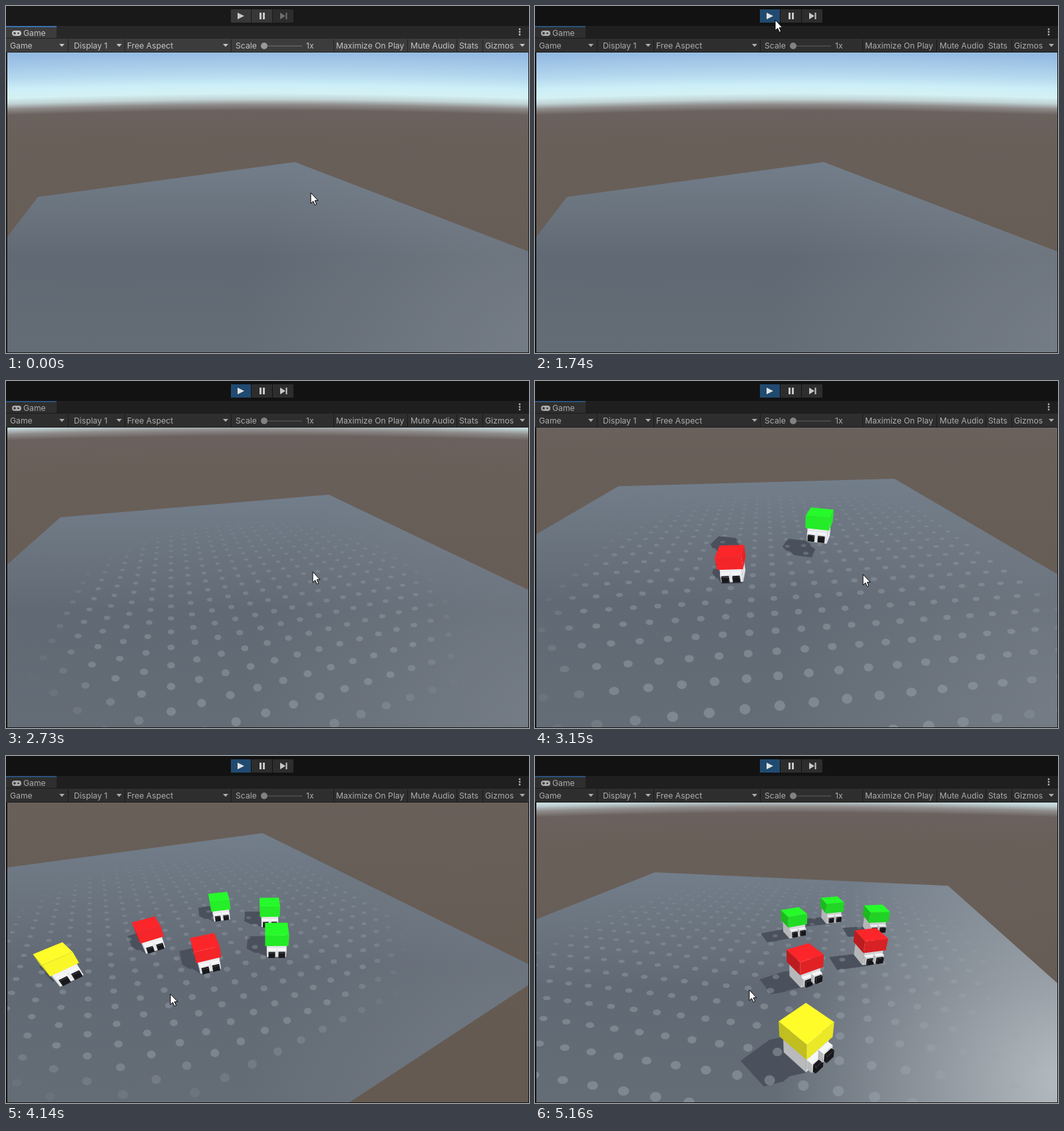
An HTML page with a canvas that plays this animation: 786x522 px, repeating every 5.19 s.

```html
<!DOCTYPE html>
<html>
<head>
<meta charset="utf-8">
<style>
  html, body { margin: 0; width: 100%; height: 100%; overflow: hidden; background: #191919; }
  canvas { display: block; }
</style>
</head>
<body>
<canvas id="stage" width="786" height="522"></canvas>
<script>
const ctx = document.getElementById('stage').getContext('2d');
const LOOP = 5190, STEP = 30, PLAY_AT = 420;
const FOCAL = 391, CX = 393, CY = 295;
const VIEW = { x: 2, y: 70, w: 783, h: 451 };
const HALF = 5;
const LIGHT = [0.41, -0.91], SHADOW = [-0.37, 0.83];

// time, camera x, z, height, yaw, pitch (degrees)
const CAMERA = [
  [1740, -2.12, -5.48, 3.1, 28.1, 22.6],
  [2340, -2.07, -5.36, 3.1, 28, 28.2],
  [3150, 0.18, -4.9, 2.44, 6.1, 34],
  [4140, -0.41, -5.62, 2.84, 28, 38],
  [4740, -3.44, -4.31, 3.56, 49, 33.6],
  [5160, -3.64, -1.68, 2.39, 80.5, 31]
];
// time, pointer x, y
const POINTER = [
  [30, 458, 281], [210, 361, 21], [1740, 361, 21], [2340, 414, 283],
  [3150, 493, 291], [4140, 247, 358], [4740, 289, 360], [5160, 322, 352]
];
// time, center x, z and radius of the visible dots
const DOT_PATCH = [[1900, -0.4, -0.9, 0], [2340, -0.4, -0.9, 2.6], [3150, 0.8, -0.3, 4.3]];

const RED = [252, 38, 42], GREEN = [38, 250, 42], YELLOW = [255, 252, 42];
const WHITE = [244, 246, 248], BLACK = [26, 26, 30];
const CREW = [
  { x: -0.46, z: -1.27, color: RED, lands: 3155 },
  { x: 1.0, z: -0.85, color: GREEN, lands: 3185 },
  { x: 0.27, z: -2.25, color: RED, lands: 3500 },
  { x: 1.8, z: -1.55, color: GREEN, lands: 3600 },
  { x: 1.45, z: -2.45, color: GREEN, lands: 3700 },
  { x: -1.79, z: -1.47, color: YELLOW, lands: 3800 }
];
const FALL_TIME = 350, FALL_HEIGHT = 2.5, TURN_LAG = 330, SIZE = 0.93;

const clamp = (v, lo = 0, hi = 1) => Math.max(lo, Math.min(hi, v));
const rgb = (c, k = 1) => `rgb(${c.map(v => Math.round(v * k)).join()})`;
const gray = v => rgb([v, v, v]);

// Smooth curve through the keys; at rest at both ends and on repeated values.
function sample(keys, t) {
  const last = keys.length - 1;
  if (t <= keys[0][0]) return keys[0].slice(1);
  if (t >= keys[last][0]) return keys[last].slice(1);
  const i = keys.findIndex(k => k[0] > t) - 1;
  const a = keys[i], b = keys[i + 1], span = b[0] - a[0], u = (t - a[0]) / span;
  const slope = (n, j) => {
    if (n === 0 || n === last) return 0;
    const p = keys[n - 1], k = keys[n], q = keys[n + 1];
    const before = (k[j] - p[j]) / (k[0] - p[0]), after = (q[j] - k[j]) / (q[0] - k[0]);
    return before * after <= 0 ? 0 : 2 * before * after / (before + after);
  };
  return a.slice(1).map((_, n) => {
    const j = n + 1, m0 = slope(i, j) * span, m1 = slope(i + 1, j) * span;
    const d = b[j] - a[j];
    return a[j] + u * (m0 + u * (3 * d - 2 * m0 - m1 + u * (m0 + m1 - 2 * d)));
  });
}

let cam;
function setCamera(t) {
  const [x, z, h, yaw, pitch] = sample(CAMERA, t);
  const y = yaw * Math.PI / 180, p = pitch * Math.PI / 180;
  cam = { x, z, h, yaw, cy: Math.cos(y), sy: Math.sin(y), cp: Math.cos(p), sp: Math.sin(p) };
}

function toCamera([x, y, z]) {
  const dx = x - cam.x, dz = z - cam.z, drop = cam.h - y;
  const ahead = dx * cam.sy + dz * cam.cy;
  return [dx * cam.cy - dz * cam.sy, drop * cam.cp - ahead * cam.sp, ahead * cam.cp + drop * cam.sp];
}
const toScreen = ([x, y, d]) => [CX + FOCAL * x / d, CY + FOCAL * y / d];

function clipNear(points, near = 0.05) {
  const out = [];
  points.forEach((a, i) => {
    const b = points[(i + 1) % points.length];
    if (a[2] > near) out.push(a);
    if ((a[2] > near) !== (b[2] > near)) {
      const u = (near - a[2]) / (b[2] - a[2]);
      out.push(a.map((v, j) => v + (b[j] - v) * u));
    }
  });
  return out;
}

function path(points) {
  ctx.beginPath();
  points.forEach(p => ctx.lineTo(p[0], p[1]));
  ctx.closePath();
}
function polygon(points, fill) {
  const visible = clipNear(points.map(toCamera));
  if (visible.length < 3) return;
  path(visible.map(toScreen));
  ctx.fillStyle = fill;
  ctx.fill();
}

function drawSky() {
  const haze = CY - FOCAL * cam.sp / cam.cp + 19;
  const g = ctx.createLinearGradient(0, -100, 0, 400);
  [[-100, '#8ab0dc'], [-78, '#9abfe4'], [-50, '#b4d8ee'], [-32, '#cdeff8'], [-20, '#d4f1f3'],
   [-11, '#c0d2d4'], [-3, '#8f8c8b'], [6, '#6b625f'], [40, '#69605a'], [400, '#645a51']]
    .forEach(([y, c]) => g.addColorStop((y + 100) / 500, c));
  for (let x = 0; x < 786; x += 6) {
    const bend = 17 * (Math.hypot(1, (x + 3 - CX) / FOCAL) - 1);
    ctx.save();
    ctx.translate(0, haze + bend);
    ctx.fillStyle = g;
    ctx.fillRect(x, -300, 6, 900);
    ctx.restore();
  }
}

function drawFloor() {
  const corners = [[-HALF, 0, HALF], [HALF, 0, HALF], [HALF, 0, -HALF], [-HALF, 0, -HALF]];
  const top = Math.min(...corners.slice(0, 2).map(c => toScreen(toCamera(c))[1]));
  const g = ctx.createLinearGradient(0, top, 0, 521);
  g.addColorStop(0, '#737e8b');
  g.addColorStop(0.2, '#6c7681');
  g.addColorStop(0.5, '#616974');
  g.addColorStop(1, '#646c76');
  polygon(corners, g);
  const shine = 0.18 + 0.7 * clamp((cam.yaw - 49) / 31);
  const glow = ctx.createRadialGradient(800, 490, 20, 800, 490, 440);
  glow.addColorStop(0, `rgba(188,195,200,${shine})`);
  glow.addColorStop(1, 'rgba(188,195,200,0)');
  polygon(corners, glow);
}

function drawDots(t) {
  const [px, pz, reach] = sample(DOT_PATCH, t);
  ctx.fillStyle = '#9aa3ab';
  for (let i = -13; i < 13; i++) for (let j = -13; j < 13; j++) {
    const x = (i + 0.5) / 3, z = (j + 0.5) / 3;
    const shown = clamp((reach - Math.hypot(x - px, z - pz)) * 1.5);
    const p = toCamera([x, 0, z]);
    if (!shown || p[2] < 0.3) continue;
    const [sx, sy] = toScreen(p), r = 0.052 * FOCAL / p[2];
    ctx.globalAlpha = shown * clamp(0.68 - p[2] * 0.065, 0.08, 0.5);
    ctx.beginPath();
    ctx.ellipse(sx, sy, r, r * clamp(cam.h / Math.hypot(...p) + 0.1), 0, 0, 7);
    ctx.fill();
  }
  ctx.globalAlpha = 1;
}

// Footprint of a box from back/front and left/right offsets in the facing direction.
function footprint(at, [back, front], [left, right]) {
  const c = Math.cos(at.facing) * SIZE, s = Math.sin(at.facing) * SIZE;
  return [[front, left], [front, right], [back, right], [back, left]]
    .map(([f, r]) => [at.x + f * c - r * s, at.z + f * s + r * c]);
}

function box(at, depth, width, [low, high], color) {
  const base = footprint(at, depth, width), y0 = at.y + low * SIZE, y1 = at.y + high * SIZE;
  base.forEach(([x, z], k) => {
    const [x2, z2] = base[(k + 1) % 4], a = at.facing + k * Math.PI / 2;
    const nx = Math.cos(a), nz = Math.sin(a);
    if (nx * (cam.x - x) + nz * (cam.z - z) <= 0) return;
    const shade = 0.86 + 0.12 * (nx * LIGHT[0] + nz * LIGHT[1]);
    polygon([[x, y0, z], [x2, y0, z2], [x2, y1, z2], [x, y1, z]], rgb(color, shade));
  });
  if (cam.h > y1) polygon(base.map(([x, z]) => [x, y1, z]), rgb(color));
}

function boxShadow(at, half, low, high) {
  const base = footprint(at, [-half, half], [-half, half]);
  const cast = ([x, z], y) => [x + SHADOW[0] * y, 0, z + SHADOW[1] * y];
  const y0 = at.y + low * SIZE, y1 = at.y + high * SIZE, fill = '#4a515d';
  base.forEach((p, k) => {
    const q = base[(k + 1) % 4];
    polygon([cast(p, y0), cast(q, y0), cast(q, y1), cast(p, y1)], fill);
  });
  polygon(base.map(p => cast(p, y1)), fill);
}

// Each member drops in, then keeps turning toward where the camera was a moment ago.
function crewAt(t) {
  const [lookX, lookZ] = sample(CAMERA, t - TURN_LAG);
  return CREW.filter(m => t >= m.lands - FALL_TIME).map(m => {
    const u = clamp((t - m.lands) / FALL_TIME + 1);
    return {
      ...m,
      y: FALL_HEIGHT * (1 - u * u),
      facing: Math.atan2(lookZ - m.z, lookX - m.x),
      distance: Math.hypot(m.x - cam.x, m.z - cam.z)
    };
  }).sort((a, b) => b.distance - a.distance);
}

function drawShadows(crew) {
  crew.forEach(m => {
    boxShadow(m, 0.18, 0, 0.27);
    boxShadow(m, 0.21, 0.27, 0.5);
  });
}

function drawCrew(crew) {
  crew.forEach(m => {
    box(m, [-0.18, 0.18], [-0.18, 0.18], [0, 0.27], WHITE);
    for (const side of [-0.09, 0.09]) {
      box(m, [0.18, 0.25], [side - 0.08, side + 0.08], [0.05, 0.2], WHITE);
      box(m, [0.25, 0.29], [side - 0.06, side + 0.06], [0.06, 0.17], BLACK);
    }
    box(m, [-0.21, 0.21], [-0.21, 0.21], [0.27, 0.5], m.color);
  });
}

function rect(x, y, w, h, fill) {
  ctx.fillStyle = fill;
  ctx.fillRect(x, y, w, h);
}
function shape(points, fill) {
  path(points);
  ctx.fillStyle = fill;
  ctx.fill();
}
function disc(x, y, r, fill) {
  ctx.beginPath();
  ctx.arc(x, y, r, 0, 7);
  ctx.fillStyle = fill;
  ctx.fill();
}

function drawToolbar(playing) {
  const ink = gray(playing ? 172 : 196), edge = gray(playing ? 27 : 35);
  const bar = gray(playing ? 46 : 60), button = gray(playing ? 45 : 56);
  rect(0, 0, 786, 30, gray(playing ? 18 : 25));
  rect(0, 30, 786, 19, gray(playing ? 31 : 40));
  rect(0, 30, 76, 19, bar);
  rect(0, 30, 76, 2, playing ? '#2b527c' : '#3a72b0');
  rect(0, 49, 786, 20, bar);
  rect(0, 48, 786, 1, edge);
  rect(0, 69, 786, 1, edge);

  rect(338, 5, 30, 20, playing ? '#214a70' : button);
  rect(369, 5, 31, 20, button);
  rect(401, 5, 31, 20, playing ? button : gray(44));
  const icon = gray(playing ? 225 : 200), stepIcon = playing ? gray(200) : gray(110);
  shape([[348, 10], [358, 15], [348, 20]], icon);
  rect(381, 10, 3, 10, gray(200));
  rect(386, 10, 3, 10, gray(200));
  shape([[412, 10], [420, 15], [412, 20]], stepIcon);
  rect(420.5, 10, 2, 10, stepIcon);

  ctx.beginPath();
  ctx.roundRect(9, 37, 14, 8, 4);
  ctx.fillStyle = ink;
  ctx.fill();
  rect(11, 40.3, 4, 1.3, bar);
  rect(12.3, 39, 1.3, 4, bar);
  disc(18.5, 41, 1.3, bar);
  [35, 39, 43].forEach(y => disc(772, y, 1.4, ink));

  [93, 178, 338, 492, 603, 677, 716].forEach(x => rect(x, 50, 1, 19, edge));
  [84, 170, 330, 776].forEach(x => shape([[x - 4, 57], [x + 4, 57], [x, 61.5]], ink));
  rect(388, 59.5, 57, 1.5, gray(playing ? 80 : 98));
  disc(388, 60, 5, gray(playing ? 130 : 153));

  ctx.font = '12.2px Inter, Roboto, sans-serif';
  ctx.fillStyle = ink;
  [['Game', 26, 45], ['Game', 6, 64], ['Display 1', 102, 64], ['Free Aspect', 182, 64],
   ['Scale', 345, 64], ['1x', 451, 64], ['Maximize On Play', 496, 64],
   ['Mute Audio', 608, 64], ['Stats', 681, 64], ['Gizmos', 720, 64]]
    .forEach(([label, x, y]) => ctx.fillText(label, x, y));
}

function drawPointer(t) {
  const [x, y] = sample(POINTER, t);
  path([[0, 0], [0, 16], [3.7, 12.6], [6.2, 18.4], [8.7, 17.3], [6.2, 11.7], [11, 11.7]]
    .map(([dx, dy]) => [x + dx, y + dy]));
  ctx.fillStyle = '#fff';
  ctx.fill();
  ctx.strokeStyle = '#000';
  ctx.lineWidth = 1;
  ctx.stroke();
}

function render(now) {
  const t = Math.floor((now % LOOP) / STEP) * STEP;
  const playing = t >= PLAY_AT;
  setCamera(t);
  const crew = crewAt(t);
  rect(0, 0, 786, 522, gray(playing ? 18 : 25));
  ctx.save();
  ctx.beginPath();
  ctx.rect(VIEW.x, VIEW.y, VIEW.w, VIEW.h);
  ctx.clip();
  drawSky();
  drawFloor();
  drawShadows(crew);
  drawDots(t);
  drawCrew(crew);
  ctx.restore();
  drawToolbar(playing);
  drawPointer(t);
}

const start = performance.now();
function tick() {
  render(performance.now() - start);
  requestAnimationFrame(tick);
}
tick();
</script>
</body>
</html>
```
